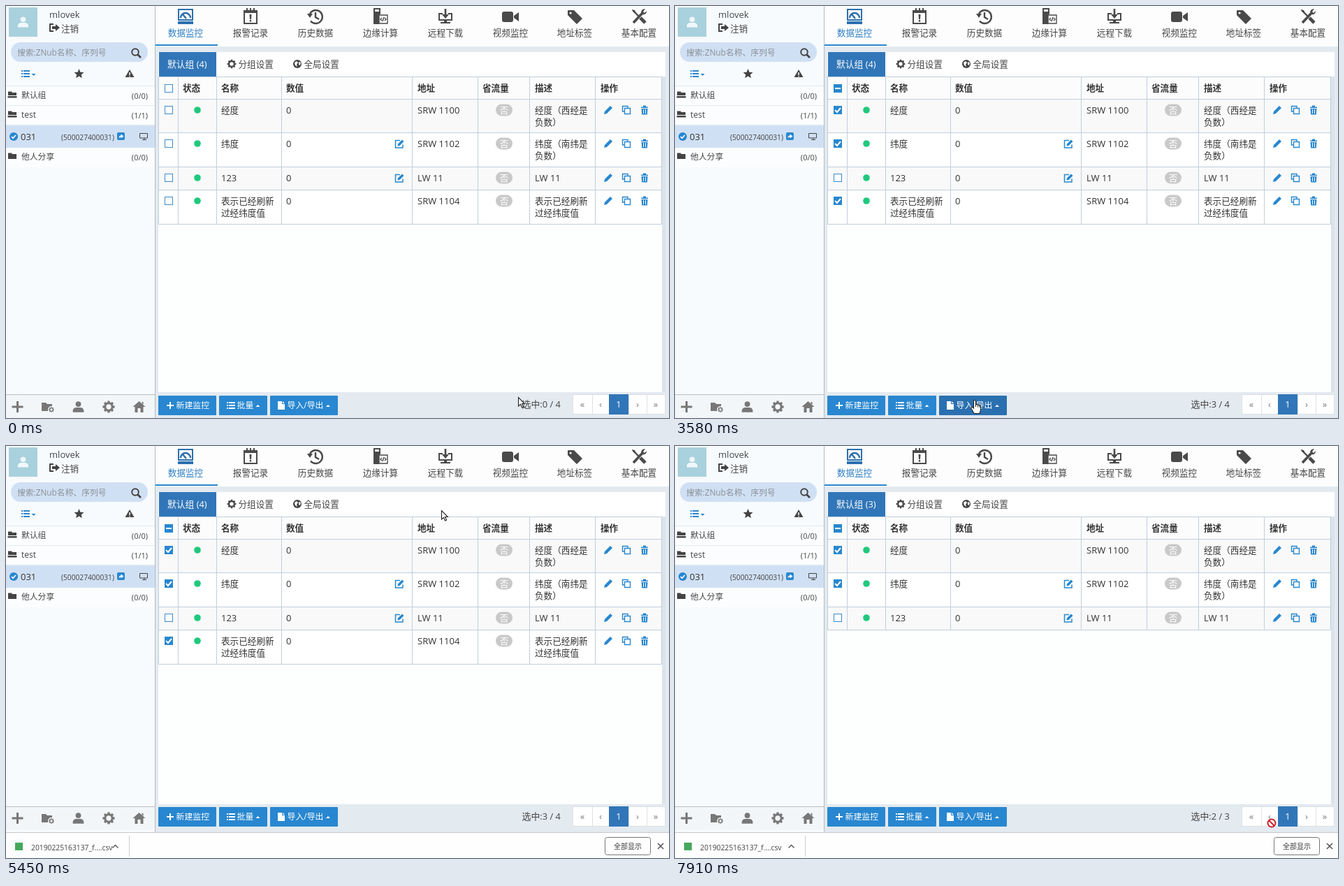
An HTML page with a canvas for the animation above (7.99 s loop, 949x590 px).

```html
<!DOCTYPE html>
<html lang="zh-CN">
<head>
<meta charset="utf-8">
<title>数据监控</title>
<style>
html, body { margin: 0; width: 100%; height: 100%; overflow: hidden; background: #fff; }
canvas { display: block; }
</style>
</head>
<body>
<canvas id="stage" width="949" height="590"></canvas>
<script>
const c = document.getElementById('stage').getContext('2d');
const LOOP = 7990;
const FONT = "'Open Sans','Noto Sans CJK SC','Noto Sans CJK',sans-serif";
const BLUE = '#2887d0', DEEP = '#3176b8', INK = '#333', GREY = '#4a4a4a', SOFT = '#777', LINE = '#c0cfde';

// Moments at which the interface changes
const AT = {
  check1: 1160, check2: 2260, check4: 3120, hover: 3420, menu: 3800, menuEnd: 4660,
  status: 4740, shelf: 4820, reveal: 4840, ring: 4900, statusEnd: 5300,
  focus: 6060, dialog: 6300, dialogEnd: 6800, loading: 6860, removed: 7170
};

// Pointer path: time, x, y, shape
const PATH = [
  [0, 733, 560, 'arrow'], [70, 733, 560, 'arrow'], [860, 229, 152, 'arrow'], [930, 233, 152, 'hand'],
  [1250, 233, 152, 'hand'], [1420, 231, 193, 'hand'], [1560, 231, 193, 'hand'], [1830, 231, 241, 'hand'],
  [2110, 231, 194, 'hand'], [2480, 231, 194, 'hand'], [2890, 232, 276, 'hand'], [3170, 232, 276, 'arrow'],
  [3350, 425, 540, 'arrow'], [3500, 429, 564, 'hand'], [3900, 429, 564, 'hand'], [4280, 411, 494, 'hand'],
  [4360, 411, 494, 'hand'], [4510, 412, 484, 'hand'], [4660, 412, 484, 'arrow'], [4970, 623, 92, 'arrow'],
  [5450, 623, 92, 'arrow'], [6050, 916, 277, 'hand'], [6340, 916, 277, 'arrow'], [6680, 485, 138, 'hand'],
  [6820, 485, 138, 'arrow'], [6980, 476, 178, 'arrow'], [7000, 476, 178, 'arrow'], [7170, 640, 390, 'arrow'],
  [7520, 872, 522, 'arrow'], [7700, 854, 540, 'banned'], [LOOP, 854, 540, 'banned']
];

const between = (t, a, b) => t >= a && t < b;
const clamp = v => Math.max(0, Math.min(1, v));

// Vertical shift of the bottom bars, snapped to whole pixels
let lift = 0;
const low = y => Math.round(y + lift);

function box(x, y, w, h, color) {
  c.fillStyle = color;
  c.fillRect(x, y, w, h);
}
function frame(x, y, w, h, color) {
  c.strokeStyle = color;
  c.lineWidth = 1;
  c.strokeRect(x + .5, y + .5, w - 1, h - 1);
}
function pill(x, y, w, h, r, fill, stroke) {
  c.beginPath();
  c.roundRect(x, y, w, h, r);
  if (fill) { c.fillStyle = fill; c.fill(); }
  if (stroke) { c.strokeStyle = stroke; c.lineWidth = 1; c.stroke(); }
}
function disc(x, y, r, color) {
  c.beginPath();
  c.arc(x, y, r, 0, 7);
  c.fillStyle = color;
  c.fill();
}
function ring(x, y, r, color, width) {
  c.beginPath();
  c.arc(x, y, r, 0, 7);
  c.strokeStyle = color;
  c.lineWidth = width;
  c.stroke();
}
function text(s, x, y, size = 12.6, color = INK, align = 'left', weight = 400) {
  c.font = `${weight} ${size}px ${FONT}`;
  c.textAlign = align;
  c.fillStyle = color;
  c.fillText(s, x, y + size * .36);
}
// Fills the path, or strokes it when a width is given
function icon(d, x, y, color, width) {
  c.save();
  c.translate(x, y);
  const p = new Path2D(d);
  if (width) { c.strokeStyle = color; c.lineWidth = width; c.stroke(p); }
  else { c.fillStyle = color; c.fill(p, 'evenodd'); }
  c.restore();
}
function gear(x, y, r, color) {
  ring(x, y, r * .61, color, r * .36);
  c.lineWidth = r * .4;
  c.beginPath();
  for (let i = 0; i < 8; i++) {
    const a = i * Math.PI / 4, u = Math.cos(a), v = Math.sin(a);
    c.moveTo(x + u * r * .7, y + v * r * .7);
    c.lineTo(x + u * r, y + v * r);
  }
  c.stroke();
}
function listIcon(x, y, color) {
  for (const dy of [-4, 0, 4]) {
    box(x, y + dy - 1, 2, 2, color);
    box(x + 3, y + dy - 1, 9, 2, color);
  }
}
const caretUp = (x, y) => icon('M-3 1.5L0-1.5L3 1.5Z', x, y, '#fff');
const person = (x, y, k, color) => {
  disc(x, y - 4 * k, 4 * k, color);
  icon(`M${-8 * k} ${8 * k}V${5 * k}Q${-7 * k} ${k} ${-3 * k} ${k}H${3 * k}Q${7 * k} ${k} ${8 * k} ${5 * k}V${8 * k}Z`, x, y, color);
};

const NAV = [
  ['数据监控', 257, (x, y) => {
    icon('M-11-11H11V6H-11ZM-9-9V4H9V-9ZM-11 7H11V11H-11Z', x, y, '#2c6fae');
    icon('M-7 2A7 7 0 0 1 7 2M1 3L-4-3', x, y, '#2c6fae', 2.4);
  }],
  ['报警记录', 350, (x, y) => {
    icon('M-9-8H9V10H-9Z', x, y, GREY, 2);
    icon('M-10-9H10V-5H-10ZM-6-12H-4V-7H-6ZM-1-12H1V-7H-1ZM4-12H6V-7H4ZM-1.5-3H1.5L1 4H-1ZM-1.2 5H1.2V7.5H-1.2Z', x, y, GREY);
  }],
  ['历史数据', 443, (x, y) => {
    icon('M-8-4A9.5 9.5 0 1 1-7 6.5M0-6V1L5 4', x, y, GREY, 2.4);
    icon('M-12-4H-4L-8 2Z', x, y, GREY);
  }],
  ['边缘计算', 536, (x, y) => {
    icon('M-10-12H0V-3H-2V11H-10ZM-8-10V-7H-2V-10Z', x, y, GREY);
    icon('M-2-2H10V10H-2ZM2 2L0 4L2 6M6 2L8 4L6 6M5 1L3 7', x, y, GREY, 1.4);
  }],
  ['远程下载', 629, (x, y) => {
    icon('M-4-4H-9V5H9V-4H4', x, y, GREY, 2);
    icon('M-1.3-11H1.3V-3H5L0 3L-5-3H-1.3ZM-2 6H2V8H7V10H-7V8H-2Z', x, y, GREY);
  }],
  ['视频监控', 722, (x, y) => {
    pill(x - 12, y - 7, 16, 15, 3, GREY);
    icon('M5-1L12-6V7L5 2Z', x, y, GREY);
  }],
  ['地址标签', 814, (x, y) => {
    icon('M-10-8Q-10-9-9-9H-1L11 3L3 11L-10-2ZM-7.5-5A1.6 1.6 0 1 0-4.3-5A1.6 1.6 0 1 0-7.5-5Z', x, y, GREY);
  }],
  ['基本配置', 906, (x, y) => {
    icon('M-8 9L6-6', x, y, GREY, 3.6);
    icon('M-8-8L0 0', x, y, GREY, 2.4);
    icon('M2 2L9 9', x, y, GREY, 4.6);
    icon('M3-5Q3-11 9-11L6-7L8-5L11-8Q11-2 5-3ZM-10-10L-6-9L-4-5L-9-7Z', x, y, GREY);
  }]
];

function drawSidebar() {
  box(0, 0, 213, 590, '#f8fbfe');
  box(4, 2, 41, 42, '#a8d1dd');
  person(24.5, 23, .95, '#f1f7f9');
  text('mlovek', 62, 12, 13, '#444');
  icon('M-1-5H-6V5H-1', 69, 31, '#444', 2);
  icon('M-3-2H2V-5L8 0L2 5V2H-3Z', 69, 31, '#444');
  text('注销', 79, 32, 12.6, '#444');

  pill(7, 52, 196, 28, 14, '#d0e0f4');
  text('搜索:ZNub名称、序列号', 16, 67, 11.8, '#8a8f96');
  ring(185, 66, 4.8, '#444', 2);
  icon('M3.5 3.5L8 8', 185, 66, '#444', 2.6);

  listIcon(22, 97, BLUE);
  icon('M-3-1.5H3L0 1.5Z', 39.5, 98.5, BLUE);
  icon('M0-7L2-2.2L7-2L3.2 1.4L4.4 6.2L0 3.6L-4.4 6.2L-3.2 1.4L-7-2L-2-2.2Z', 104.5, 97, '#444');
  icon('M0-6L6.5 5H-6.5ZM-.8-2V2H.8V-2ZM-.8 3V4.3H.8V3Z', 177, 97, '#444');

  box(0, 114, 213, 117, '#fcfdfe');
  for (const y of [114, 142, 170]) box(0, y, 213, 1, '#e4eaef');
  const folder = y => icon('M-6-4.5H-1L0-3H6V1H-6ZM-6.5 2H6.5V4.5H-6.5Z', 9, y, '#444');
  folder(127);
  text('默认组', 22, 128, 11.8, '#444');
  text('(0/0)', 203, 129, 11, '#444', 'right');
  folder(155);
  text('test', 22, 156, 12, '#444');
  text('(1/1)', 203, 157, 11, '#444', 'right');
  box(0, 171, 213, 32, '#d0e0f4');
  disc(11, 187, 6, BLUE);
  icon('M-3 0L-1 2.3L3-2', 11, 187, '#fff', 1.7);
  text('031', 21, 187, 13);
  text('(500027400031)', 79, 188, 10.2, '#444');
  pill(159, 181, 11, 11, 2, BLUE);
  icon('M-3 3Q-3-1 0-1V-3L4 0L0 3V1Q-2 1-3 3Z', 164.5, 186.5, '#fff');
  icon('M-5.5-4.5H5.5V2H-5.5ZM1 2V4.5M-2 4.5H4', 197, 187, '#444', 1);
  icon('M-6-4.5H-1L0-3H6V4H-6Z', 9, 215, '#444');
  text('他人分享', 22, 216, 11.8, '#444');
  text('(0/0)', 203, 217, 11, '#444', 'right');

  box(0, low(556), 213, 34, '#f3f6f9');
  box(0, low(556), 213, 1, '#b9bec3');
  const y = low(573.5);
  icon('M-8-1.5H-1.5V-8H1.5V-1.5H8V1.5H1.5V8H-1.5V1.5H-8Z', 16.5, y, SOFT);
  icon('M-8-6H-2L0-4H7V6H-8Z', 59, y, SOFT);
  disc(65, y + 4, 5, '#f3f6f9');
  gear(65, y + 4, 3.8, SOFT);
  person(103.5, y, .98, SOFT);
  gear(147, y, 8.5, SOFT);
  icon('M0-8L9 0H6V8H2V2H-2V8H-6V0H-9ZM4-7H6V-3L4-5Z', 190.5, y, SOFT);
  box(213, 0, 1, 590, '#b4bac0');
}

function drawHeader(total) {
  box(214, 0, 735, 58, '#fdfdfd');
  NAV.forEach(([label, x, draw], i) => {
    draw(x, 15);
    text(label, x, 38, 12.6, i ? '#444' : '#2c7fc4', 'center');
  });
  box(214, 55, 89, 2, BLUE);
  box(218, 66, 726, 35, '#fff');
  box(219, 66, 82, 35, DEEP);
  text(`默认组 (${total})`, 231, 83.5, 12.8, '#fff');
  gear(323, 83, 6.3, '#444');
  text('分组设置', 332.5, 83.5, 12.6, '#444');
  disc(417, 83, 6, '#444');
  icon('M-4-2L-1-4L1-2L-1 1L0 4L-3 2ZM2-3L5-2L4 2L2 1Z', 417, 83, '#fff');
  text('全局设置', 426.5, 83.5, 12.6, '#444');
}

function checkbox(y, state) {
  box(227, y - 6, 12, 12, state ? BLUE : '#fff');
  if (!state) return frame(227, y - 6, 12, 12, '#3d8ccc');
  icon(state === 'some' ? 'M-4 0H4' : 'M-4 0L-1 3L4-3', 233, y, '#fff', 2);
}

const COLS = [218, 246, 301, 394, 581, 675, 749, 843, 938];
const HEADS = [['状态', 253], ['名称', 308], ['数值', 401], ['地址', 589], ['省流量', 682], ['描述', 757], ['操作', 851]];
const ROWS = [
  { top: 133, end: 181, name: ['经度'], addr: 'SRW 1100', desc: ['经度（西经是', '负数）'] },
  { top: 181, end: 230, name: ['纬度'], addr: 'SRW 1102', desc: ['纬度（南纬是', '负数）'], edit: true },
  { top: 230, end: 263, name: ['123'], addr: 'LW 11', desc: ['LW 11'], edit: true },
  { top: 263, end: 312, name: ['表示已经刷新', '过经纬度值'], addr: 'SRW 1104', desc: ['表示已经刷新', '过经纬度值'] }
];

// Latin-only cells are set slightly larger than Chinese ones
function cell(lines, x, y) {
  lines.forEach((s, n) => text(s, x, y + n * 17.3, /^[\w ]+$/.test(s) ? 13 : 12.6));
}

function drawRow(row, i, checked, t) {
  const y = row.top + 16.5;
  box(218, row.top, 720, row.end - row.top, i % 2 ? '#fff' : '#f9f9f9');
  checkbox(Math.round(y - .4), checked);
  disc(274, y - .5, 4.8, '#1fc97c');
  cell(row.name, 308, y);
  cell(['0'], 401, y);
  if (row.edit) {
    icon('M1-5H-5.5V5.5H5V1', 563, y, BLUE, 1.5);
    icon('M-2 0L4-6L6.5-3.5L.5 2.5L-2.5 3Z', 563, y, BLUE);
  }
  cell([row.addr], 589, y);
  pill(701, y - 9, 24, 17, 8.5, '#c9c9c9');
  text('否', 713, y - .5, 12.6, '#fff', 'center');
  cell(row.desc, 757, y);
  icon('M-6 6L-5 2L3-6L6-3L-2 5Z', 862, y - .5, BLUE);
  icon('M-2.5-2.5H5.5V5.5H-2.5ZM-2.5 2H-5.5V-5.5H2V-2.5', 888, y - .5, BLUE, 1.4);
  if (i === 3 && t >= AT.focus) {
    box(902, 270, 24, 21, '#fff');
    frame(902, 270, 24, 21, '#86a9e0');
  }
  icon('M-5-4.5H5V-3H-5ZM-2-6.5H2V-4.5H-2ZM-4.5-2H4.5L3.8 6.5H-3.8ZM-2-1V5H-1V-1ZM1-1V5H2V-1Z', 914, y - .5, BLUE);
}

function drawTable(t, checks, count) {
  box(218, 101, 721, 32, '#fcfcfc');
  for (const [s, x] of HEADS) text(s, x, 117.5, 12.6, INK, 'left', 700);
  checkbox(118, checks.some(Boolean) && 'some');
  const rows = ROWS.slice(0, count);
  rows.forEach((row, i) => drawRow(row, i, checks[i], t));
  const bottom = rows[count - 1].end;
  for (const x of COLS) box(x, 101, 1, bottom - 100, LINE);
  for (const y of [101, 133, ...rows.map(r => r.end)]) box(218, y, 721, 1, LINE);
}

function drawFooter(t, picked, total) {
  box(214, low(553), 735, 37, '#e3eaf0');
  const y = low(571.6);
  const hot = between(t, AT.hover, AT.menuEnd);
  [[218, 83], [305, 69], [378, 97]].forEach(([x, w], i) => pill(x, low(557.6), w, 28, 1, i === 2 && hot ? '#2a70b0' : BLUE));
  icon('M-5-1H-1V-5H1V-1H5V1H1V5H-1V1H-5Z', 235, y, '#fff');
  text('新建监控', 243.5, y, 11.9, '#fff');
  listIcon(316, y, '#fff');
  text('批量', 330.5, y, 11.9, '#fff');
  caretUp(360.5, y + .5);
  icon('M-5-6H1V-2H5V6H-5ZM2-6L5-3H2Z', 394, y, '#fff');
  text('导入/导出', 402.5, y, 11.9, '#fff');
  caretUp(461, y + .5);
  text(`选中:${picked} / ${total}`, 738.5, low(570), 12.9, '#444');

  const stops = [811, 839, 863, 891, 917, 943], top = low(556);
  ['«', '‹', '1', '›', '»'].forEach((s, i) => {
    const x = stops[i], w = stops[i + 1] - x, on = s === '1';
    box(x, top, w, 29, on ? DEEP : '#fff');
    if (!on) frame(x, top, w + 1, 29, '#dde1e5');
    text(s, x + w / 2, top + 14.5, 13, on ? '#fff' : SOFT, 'center');
  });
}

function drawMenu() {
  c.save();
  c.shadowColor = 'rgba(0,0,0,.18)';
  c.shadowBlur = 10;
  c.shadowOffsetY = 5;
  pill(378, 470, 125, 86, 3, '#fff');
  c.restore();
  pill(378.5, 470.5, 124, 85, 3, null, '#ccc');
  box(379, 475, 123, 25, '#f0f2f4');
  ['导出选中监控', '导出全部监控', '导入监控数据'].forEach((s, i) => text(s, 399, 488 + i * 24.6));
}

function drawDialog() {
  c.save();
  c.shadowColor = 'rgba(0,0,0,.35)';
  c.shadowBlur = 12;
  c.shadowOffsetY = 4;
  pill(324, 22, 300, 142, 4, '#fff');
  c.restore();
  text('提示', 342, 44, 14, INK, 'left', 700);
  box(324, 64, 300, 1, '#e5e5e5');
  text('确定要删除该监控点吗？', 342, 90);
  pill(466, 124, 68, 28, 2, BLUE);
  text('确定', 500, 138, 12.6, '#fff', 'center');
  pill(542.5, 124.5, 67, 27, 2, '#fff', '#ccc');
  text('取消', 576, 138, 12.6, INK, 'center');
}

function drawLoading(t) {
  const pulse = .9 + .1 * Math.cos((t - 6990) / 90);
  ['#bfe0f5', '#7fb9e4', '#3f8fd2', '#7fb9e4', '#bfe0f5'].forEach((color, i) => {
    c.globalAlpha = pulse;
    box(460 + i * 7.5, 240, 6, 12, color);
  });
  c.globalAlpha = 1;
}

function drawShelf(t) {
  box(0, 553, 949, 37, '#fefefe');
  box(0, 553, 949, 1, '#c4c8cc');
  const p = clamp((t - AT.reveal) / 800);
  const edge = Math.round(186 * (1 - (1 - p) ** 2));
  c.save();
  c.beginPath();
  c.rect(0, 554, edge, 36);
  c.clip();
  const done = (t - AT.ring) / 2500;
  if (between(done, 0, 1)) {
    c.globalAlpha = .5 + .5 * Math.cos(done * 5 * Math.PI);
    disc(19, 573, 10.5, '#e3eefa');
    ring(19, 573, 10, '#3f7fc4', 2);
    c.globalAlpha = 1;
  }
  box(13, 568, 11, 11, '#45a85c');
  text('20190225163137_f....csv', 36, 575, 10.3, '#444');
  icon('M-4 2L0-2L4 2', edge - 19.5, 573.5, '#555', 1.4);
  c.restore();
  box(edge, 558, 1, 30, '#cfcfcf');
  pill(857.5, 560.5, 65, 25, 3, '#fff', '#777');
  text('全部显示', 890, 573, 10, INK, 'center');
  icon('M-4-4L4 4M4-4L-4 4', 937, 573, '#555', 1.6);
}

function drawStatus(bottom) {
  pill(-2, bottom - 17, 314, 17, [0, 3, 0, 0], '#fff');
  text('qa.znub.vorlix.test/app/#', 0, bottom - 8, 10, SOFT);
}

function drawArrival(t) {
  const p = (t - AT.status) / 520;
  if (!between(p, 0, 1)) return;
  const y = 498 + 42 * p;
  c.globalAlpha = Math.sin(p * Math.PI);
  disc(25, y, 28, 'rgba(255,255,255,.8)');
  icon('M-4-11H4V-3H9L0 6L-9-3H-4Z', 25, y, '#4285f4');
  c.globalAlpha *= .6;
  box(12, y + 16, 26, 4, '#4285f4');
  c.globalAlpha = 1;
}

function drawPointer(t) {
  const i = PATH.findIndex(k => k[0] > t);
  const [t0, x0, y0, shape] = PATH[i - 1], [t1, x1, y1] = PATH[i];
  const p = (t - t0) / (t1 - t0), e = p * p * (3 - 2 * p);
  const x = Math.round(x0 + (x1 - x0) * e), y = Math.round(y0 + (y1 - y0) * e);
  if (shape === 'banned') {
    disc(x, y, 6, '#fff');
    ring(x, y, 5.5, '#d01f28', 2);
    icon('M-4-4L4 4', x, y, '#d01f28', 2);
    return;
  }
  const d = shape === 'hand'
    ? 'M-1.5 1.5Q0-.5 1.5 1.5V7Q3.5 5.5 4.5 7.5Q6 6.5 7 8.5Q8.5 8 8.5 10V14Q8 17 7 19.5H-1Q-3 15-5 12.5Q-5.5 10-3 10.5L-1.5 12Z'
    : 'M.5.5V13L3.5 10.3L5.5 15L7.5 14L5.5 9.5H9.3Z';
  icon(d, x, y, '#fff');
  icon(d, x, y, '#222', 1.1);
  if (shape === 'hand') icon('M1.5 7V10M4.5 8V10.5M7 9V11', x, y, '#222', 1);
}

function draw(t) {
  const shelf = t >= AT.shelf;
  lift = shelf ? -40.4 : 0;
  const total = t < AT.removed ? 4 : 3;
  const checks = [t >= AT.check1, t >= AT.check2, false, t >= AT.check4].slice(0, total);
  box(0, 0, 949, 590, '#e3eaf0');
  drawSidebar();
  drawHeader(total);
  box(218, 101, 721, low(553) - 101, '#fdfefe');
  box(939, 101, 5, low(553) - 101, '#dce3ea');
  drawTable(t, checks, total);
  drawFooter(t, checks.filter(Boolean).length, total);
  if (between(t, AT.menu, AT.menuEnd)) drawMenu();
  if (between(t, AT.loading, AT.removed)) drawLoading(t);
  if (shelf) drawShelf(t);
  if (between(t, AT.status, AT.statusEnd)) drawStatus(shelf ? 553 : 590);
  drawArrival(t);
  if (between(t, AT.dialog, AT.dialogEnd)) drawDialog();
  drawPointer(t);
}

const start = performance.now();
function tick() {
  draw((performance.now() - start) % LOOP);
  requestAnimationFrame(tick);
}
tick();
</script>
</body>
</html>
```
